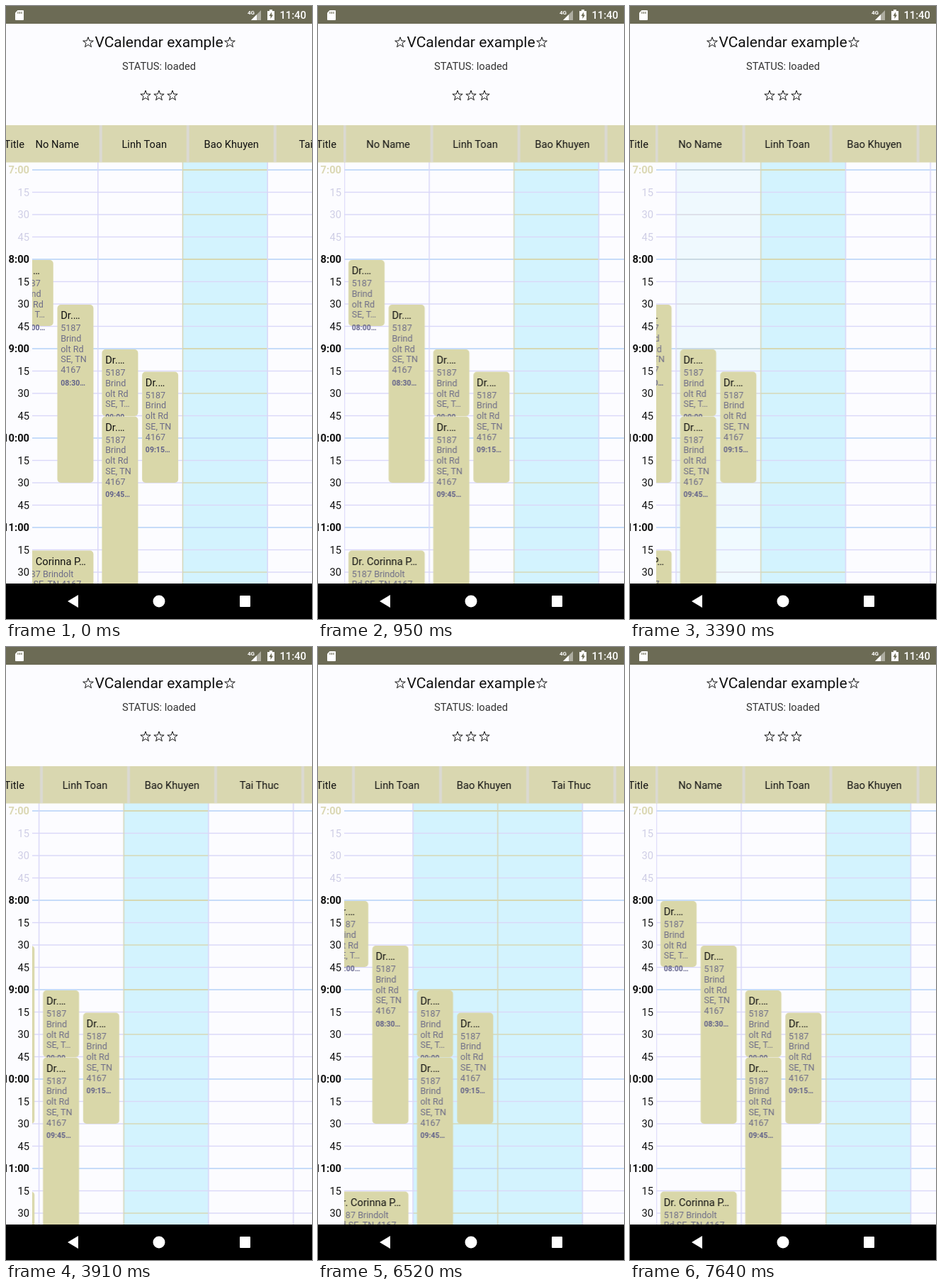
An HTML page for the animation above (8000 ms loop, 432 px wide and 864 px high).

```html
<!DOCTYPE html>
<html lang="en">
<head>
<meta charset="utf-8">
<title>VCalendar example</title>
<style>
  html, body { margin: 0; width: 100%; height: 100%; overflow: hidden; background: #fcfcff; }
  svg { display: block; width: 100%; height: 100%; font: 14.7px Roboto, sans-serif; }
  .bold { font-weight: 700; }
  .medium { font-weight: 500; }
  .mid { text-anchor: middle; }
  .end { text-anchor: end; }
  .address { font-size: 12.6px; fill: #6e6d88; }
  .time { font-size: 10.5px; font-weight: 700; fill: #62628a; }

  #columns, #heads, #pressed { animation: 8s step-end infinite; }
  #columns { animation-name: scroll-columns; }
  #heads { animation-name: scroll-heads; }
  #pressed { animation-name: press; }

  @keyframes scroll-columns {
    0% { transform: translateX(-27.5px); animation-timing-function: cubic-bezier(.2, .6, .4, 1); }
    4% { transform: translateX(0); }
    42.375% { transform: translateX(-92px); }
    44.5% { transform: translateX(-94px); }
    46.75% { transform: translateX(-110.5px); }
    81.5% { transform: translateX(-23px); }
    89.625%, 100% { transform: translateX(0); }
  }
  /* the header row follows the columns late */
  @keyframes scroll-heads {
    0% { transform: translateX(-27px); animation-timing-function: cubic-bezier(.2, .6, .4, 1); }
    4% { transform: translateX(0); }
    44.5% { transform: translateX(-92px); }
    46.75% { transform: translateX(-94px); }
    48.875% { transform: translateX(-110.5px); }
    92.875% { transform: translateX(-23px); }
    94.2% { transform: translateX(-8px); }
    95.5%, 100% { transform: translateX(0); }
  }
  @keyframes press {
    0% { opacity: 0; }
    42.375% { opacity: .3; }
    48.875% { opacity: 0; }
    64.5% { opacity: 1; }
    76.125% { opacity: 0; }
    78.875% { opacity: 1; }
    89.625%, 100% { opacity: 0; }
  }
</style>
</head>
<body>
<svg id="stage" viewBox="0 0 432 864" xmlns="http://www.w3.org/2000/svg"></svg>
<script>
const KHAKI = '#d9d7a9', LAVENDER = '#d9d7f8', BLUE = '#c6dcf9', CYAN = '#d3f3fe';
const QUARTER = 31.5, FIRST_ROW = 231, COLUMN = 119.7, HEAD = 123, LEFT = 37.3;
const ADDRESS = ['5187', 'Brind', 'olt Rd', 'SE, TN', '4167'];
const SHORT_ADDRESS = [...ADDRESS.slice(0, 3), 'SE, T…'];

const repeat = (count, draw) => Array.from({ length: count }, (_, i) => draw(i)).join('');
const rect = (x, y, w, h, fill, extra = '') =>
  `<rect x="${x}" y="${y}" width="${w}" height="${h}" fill="${fill}" ${extra}/>`;
const text = (x, y, content, cls = '', extra = '') =>
  `<text x="${x}" y="${y}" class="${cls}" ${extra}>${content}</text>`;
const rowY = i => FIRST_ROW + i * QUARTER;
const columnX = i => LEFT + i * COLUMN;

function star(cx, cy, r) {
  const points = repeat(10, i => {
    const angle = i * Math.PI / 5 - Math.PI / 2, radius = i % 2 ? r * .4 : r;
    return `${(cx + radius * Math.cos(angle)).toFixed(2)},${(cy + radius * Math.sin(angle)).toFixed(2)} `;
  });
  return `<polygon points="${points}" fill="none" stroke="#111"/>`;
}

// hour lines are two pixels thick, the others little more than one
function rowLine(i, x, width, color) {
  const height = i % 4 ? 1.4 : 2;
  return rect(x, rowY(i) - height / 2, width, height, color);
}

const gridRow = i => rowLine(i, 37, 395, i % 4 ? LAVENDER : BLUE);

function tintedColumn(i) {
  const x = columnX(i);
  return rect(x, 220, COLUMN, 594, CYAN) + repeat(19, row => {
    const blue = row === 12 || row === 16;
    return rowLine(row, x, COLUMN, blue ? BLUE : row % 2 ? LAVENDER : '#d6d8b3');
  });
}

function timeLabel(i) {
  const hour = i % 4 === 0;
  const color = i === 0 ? '#dbd8b4' : i < 4 ? '#cfcee6' : '#111';
  const label = hour ? `${7 + i / 4}:00` : i % 4 * 15;
  return text(33, rowY(i) + 5.3, label, hour ? 'bold end' : 'end', `fill="${color}"`);
}

function card(x, y, w, h, title, address, time) {
  const left = x + 4.7;
  return rect(x, y, w, h, KHAKI, 'rx="5"')
    + text(left, y + 20, title, '', 'fill="#111"')
    + repeat(address.length, i => text(left, y + 37 + i * 14.75, address[i], 'address'))
    + text(left, y + 40 + address.length * 14.75, time, 'time');
}

const statusBar = rect(0, 0, 432, 25, '#6c6b55') + `
  <g fill="#fff">
    <path d="M16.5 6H24a1 1 0 0 1 1 1v12a1 1 0 0 1-1 1H14a1 1 0 0 1-1-1V9.5z"/>
    <path d="M17 8v3M19.5 8v3M22 8v3" stroke="#6c6b55" stroke-width="1.1"/>
    <path d="M360 6v14h-14z" opacity=".45"/>
    <path d="M354 12v8h-8z"/>
    <path d="M372 5h4v2h3v13h-10V7h3z"/>
    <path d="M375 8.5l-3.5 5.5h2v4l3.5-5.5h-2z" fill="#6c6b55"/>
    ${text(341, 12, '4G', 'bold', 'font-size="8"')}
    ${text(386.5, 18, '11:40', 'medium')}
  </g>`;

const title = star(116, 51.5, 7.7) + star(316, 51.5, 7.7)
  + text(216, 58, 'VCalendar example', 'mid', 'font-size="21" fill="#111"')
  + text(216, 90, 'STATUS: loaded', 'mid', 'fill="#333"')
  + repeat(3, i => star(197 + i * 19, 126.5, 7.5));

const columns = `<g id="pressed">${tintedColumn(1)}</g>` + tintedColumn(2)
  + repeat(6, i => rect(columnX(i) - .7, 220, 1.5, 594, i === 2 ? '#d5d6b8' : LAVENDER))
  + card(43, 358, 51, 93, 'Dr.…', SHORT_ADDRESS, '08:00…')
  + card(99.7, 421, 51, 251, 'Dr.…', ADDRESS, '08:30…')
  + card(162.7, 484, 51, 94, 'Dr.…', SHORT_ADDRESS, '09:00…')
  + card(219.4, 515.5, 51, 156.5, 'Dr.…', ADDRESS, '09:15…')
  + card(162.7, 578.5, 51, 250, 'Dr.…', ADDRESS, '09:45…')
  + card(43, 767.5, 107.7, 90, 'Dr. Corinna P…', ['5187 Brindolt', 'Rd SE, TN 4167'], '11:15…');

const heads = repeat(6, i => rect(35.5 + i * HEAD, 168, 4, 52, '#dbd9d2'))
  + ['No Name', 'Linh Toan', 'Bao Khuyen', 'Tai Thuc']
    .map((name, i) => text(99 + i * HEAD, 200, name, 'mid', 'fill="#111"')).join('');

const navBar = rect(0, 814, 432, 50, '#000') + `
  <path d="M87 839l15-9v18z" fill="#fff"/>
  <circle cx="216" cy="839" r="8.5" fill="#fff"/>`
  + rect(330, 831, 15, 16, '#fff', 'rx="1"');

document.getElementById('stage').innerHTML = `
  <clipPath id="body-clip">${rect(37, 220, 395, 594, '#000')}</clipPath>
  <clipPath id="head-clip">${rect(36, 168, 396, 52, '#000')}</clipPath>
  ${rect(0, 0, 432, 864, '#fcfcff')}
  ${repeat(19, gridRow)}
  <g clip-path="url(#body-clip)"><g id="columns">${columns}</g></g>
  ${repeat(19, timeLabel)}
  ${rect(0, 168, 432, 52.5, '#d9d7b0')}
  <g clip-path="url(#head-clip)"><g id="heads">${heads}</g></g>
  ${text(26, 200, 'Title', 'end', 'fill="#111"')}
  ${title}${statusBar}${navBar}`;
</script>
</body>
</html>
```
